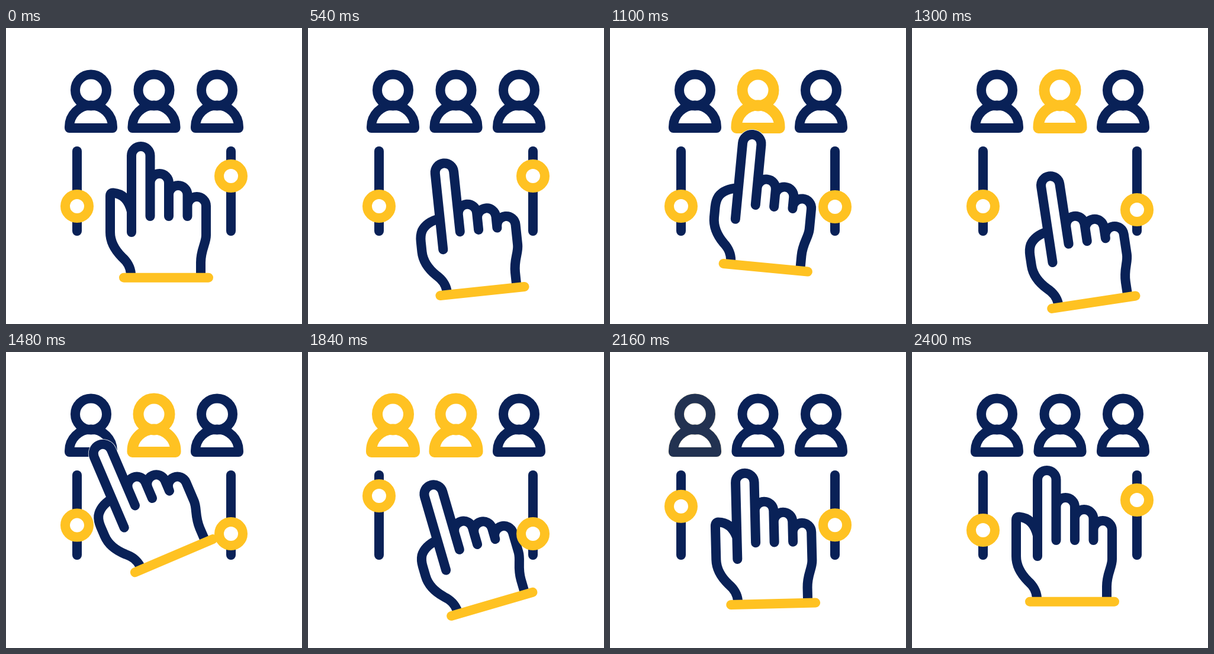
Animation, 500 px wide and 500 px high, one loop 2.72 s. Source, as an HTML page with a canvas:

```html
<!DOCTYPE html>
<html lang="en">
<head>
<meta charset="utf-8">
<title>Choosing people</title>
<style>
  html, body { margin: 0; width: 100%; height: 100%; overflow: hidden; background: #fff; }
  canvas { display: block; width: 500px; height: 500px; }
</style>
</head>
<body>
<canvas id="stage" width="500" height="500"></canvas>
<script>
const ctx = document.getElementById('stage').getContext('2d');
const NAVY = '#092157', GOLD = '#ffc222', WHITE = '#fff';
const LOOP = 2720, STEP = 20, LINE = 16;
const FADE = 200, SLIDE = 355, SETTLED = 2400;

const clamp = v => Math.min(1, Math.max(0, v));
const mix = (a, b, p) => a + (b - a) * p;
function ramp(t, from, to) {
  const p = clamp((t - from) / (to - from));
  return p * p * (3 - 2 * p);
}

// The wrist bar's centre, the tilt in degrees and how far the fingers curl.
const pose = (x, y, tilt, curl = 1) => ({ x, y, tilt, curl });
const rest = pose(270.5, 421.7, 0, 0);
const moves = [
  { from: 260, to: 540, end: pose(294.5, 444.5, -6) },
  { from: 540, to: 800, end: pose(242, 377, 12) },
  { from: 985, to: 1290, end: pose(307, 464, -8.5) },
  { from: 1290, to: 1500, end: pose(283, 341, -23.5) },
  { from: 1640, to: 1940, end: pose(320.5, 455.5, -13.7) },
  { from: 1940, to: 2215, end: rest }
];
const sliders = [
  { x: 120, home: 301, away: 243, go: 1395, back: 2020 },
  { x: 380, home: 250, away: 307, go: 810, back: 2040 }
];
const people = [
  { x: 143.5, on: 1490, off: 1980 },
  { x: 250, on: 780, off: 1930 },
  { x: 356.5, on: LOOP, off: LOOP }
];

const circle = (y, r) => `M${r} ${y} a${r} ${r} 0 1 1 ${-2 * r} 0 a${r} ${r} 0 1 1 ${2 * r} 0 Z`;
const bust = new Path2D('M-36.5 169 v-2 a36.5 36.5 0 0 1 73 0 v2 Z' + circle(105, 26.5));
const knob = new Path2D(circle(0, 20));
const track = new Path2D('M0 208 V343');
const wrist = new Path2D('M199 421.7 H342');

const PITCH = 31.5, R = PITCH / 2, INDEX_X = 212;
const fingers = [
  { top: 200, drop: 0 },
  { top: 246, drop: 27 },
  { top: 266, drop: 17 },
  { top: 285, drop: 15 }
];

function handPaths(curl) {
  const m = (open, curled) => mix(open, curled, curl);
  const thumb = 'M211 415 C210 404 206 396 196 387 C185 376 176 362 176 345 ' +
    `V${m(284, 328)} Q176 ${m(278, 317)} ${m(181, 180)} ${m(278.5, 309.5)} ` +
    `C${m(199, 186)} ${m(280, 300)} ${m(208, 196)} ${m(293, 294.5)} 212 ${m(310, 292)}`;
  const heel = 'V350 C338 364 329 374 329 396 V415';
  const tips = fingers.map(f => `V${f.top + f.drop * curl + R} a${R} ${R} 0 0 1 ${PITCH} 0 `);
  const strokes = tips.map((tip, i) =>
    `M${INDEX_X + i * PITCH} ${i ? 318 : 345} ${tip}` + (i < 3 ? 'V318 ' : heel));
  return {
    palm: new Path2D(thumb + tips.join('') + heel + 'Z'),
    lines: new Path2D(thumb + strokes.join(''))
  };
}

function stroke(path, color, width = LINE) {
  ctx.strokeStyle = color;
  ctx.lineWidth = width;
  ctx.stroke(path);
}

function fill(path) {
  ctx.fillStyle = WHITE;
  ctx.fill(path);
}

function at(x, y, paint) {
  ctx.save();
  ctx.translate(x, y);
  paint();
  ctx.restore();
}

function drawPerson({ x, on, off }, t) {
  at(x, 0, () => {
    stroke(bust, NAVY);
    ctx.globalAlpha = clamp((t - on) / FADE) - clamp((t - off) / FADE);
    stroke(bust, GOLD, LINE + 2);
  });
}

function drawHand(t) {
  const now = { ...rest };
  for (const { from, to, end } of moves) {
    const p = ramp(t, from, to);
    for (const key in now) now[key] = mix(now[key], end[key], p);
  }
  const { palm, lines } = handPaths(now.curl);
  at(now.x, now.y, () => {
    ctx.rotate(now.tilt * Math.PI / 180);
    ctx.translate(-rest.x, -rest.y);
    stroke(palm, WHITE, LINE + 1.5);
    fill(palm);
    stroke(lines, NAVY);
    stroke(wrist, GOLD);
  });
}

function drawSlider({ x, home, away, go, back }, t) {
  const p = ramp(t, go, go + SLIDE) - ramp(t, back, SETTLED);
  at(x, 0, () => stroke(track, NAVY));
  at(x, mix(home, away, p), () => {
    fill(knob);
    stroke(knob, GOLD);
  });
}

function draw(t) {
  ctx.fillStyle = WHITE;
  ctx.fillRect(0, 0, 500, 500);
  ctx.lineCap = ctx.lineJoin = 'round';
  people.forEach(p => drawPerson(p, t));
  drawHand(t);
  sliders.forEach(s => drawSlider(s, t));
}

const start = performance.now();
function tick() {
  const t = Math.max(0, performance.now() - start) % LOOP;
  draw(Math.floor(t / STEP) * STEP);
  requestAnimationFrame(tick);
}
tick();
</script>
</body>
</html>
```
